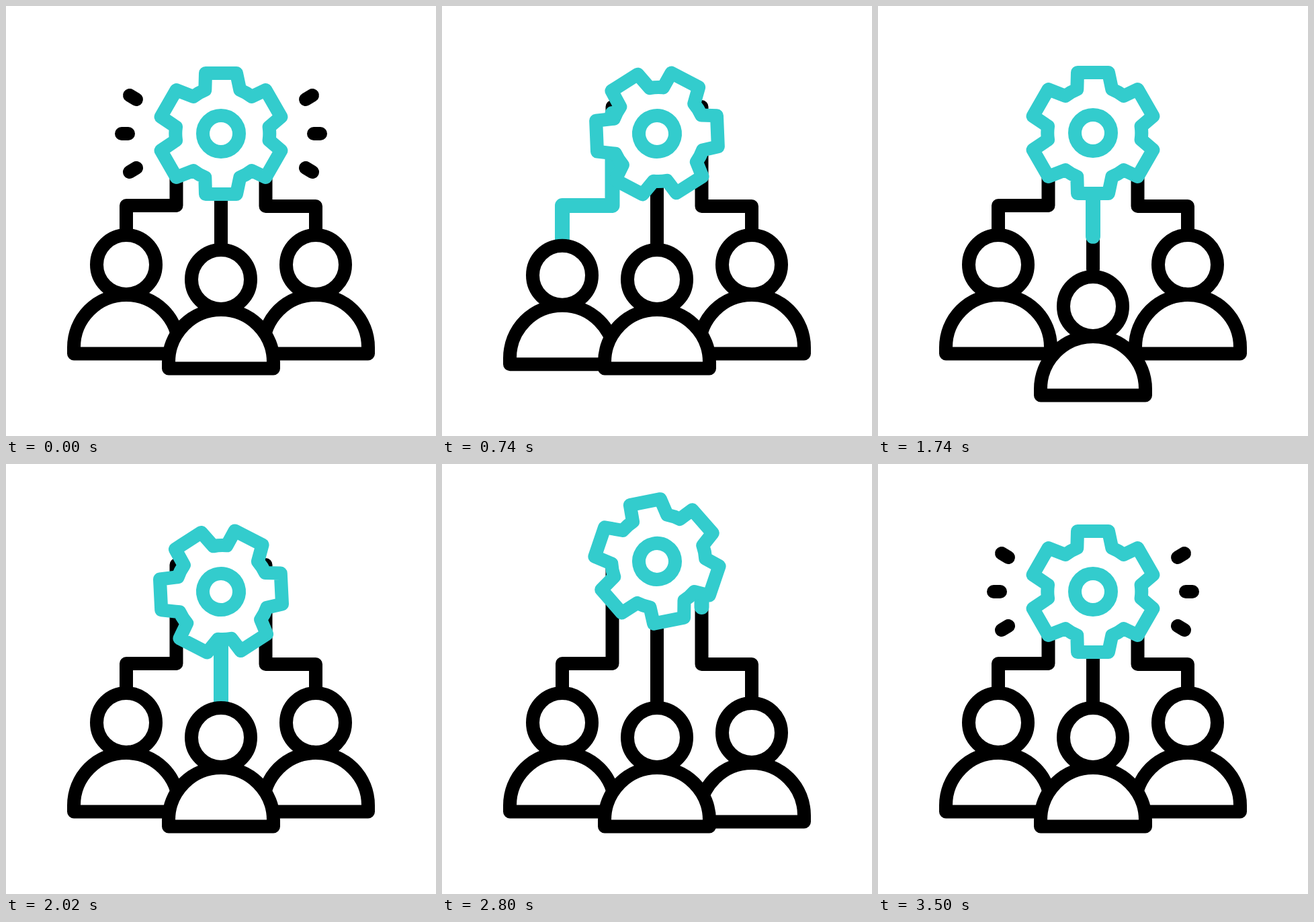
Write an HTML page that moves like this. It is 640 by 640 pixels and loops after 3600 ms.

```html
<!DOCTYPE html>
<html lang="en">
<head>
<meta charset="utf-8">
<title>Team gear</title>
<style>
  html, body { margin: 0; width: 100%; height: 100%; overflow: hidden; background: #fff; }
  svg { display: block; width: 100vw; height: 100vh; }
  path, circle { stroke-width: 20; stroke-linecap: round; stroke-linejoin: round; }
  .ink { stroke: #000; }
  .teal { stroke: #33cccd; }
  .solid { fill: #fff; }
  .line { fill: none; }
  .pulse { stroke-width: 22; }
</style>
</head>
<body>
<svg id="stage" viewBox="0 0 640 640"></svg>
<script>
const LOOP = 3600;
const stage = document.getElementById('stage');

function add(parent, tag, attrs) {
  const el = document.createElementNS('http://www.w3.org/2000/svg', tag);
  for (const k in attrs) el.setAttribute(k, attrs[k]);
  return parent.appendChild(el);
}

// Eased progress of t between two times
function ease(t, from, to) {
  const x = Math.min(1, Math.max(0, (t - from) / (to - from)));
  return x * x * (3 - 2 * x);
}

function gearPath() {
  const notchShift = 2.3;
  let d = '';
  for (let k = 0; k < 6; k++) {
    const a = k * Math.PI / 3, c = Math.cos(a), s = Math.sin(a);
    const at = (x, y, dx = 0) =>
      (x * c - y * s + dx).toFixed(2) + ' ' + (x * s + y * c).toFixed(2);
    d += (k ? 'A70 70 0 0 1 ' : 'M') + at(-26, -65, notchShift);
    d += 'L' + at(-23, -90) + 'L' + at(23, -90) + 'L' + at(26, -65, notchShift);
  }
  return d + 'A70 70 0 0 1 ' + (notchShift - 26) + ' -65Z';
}

// One entry per jump: start time, height, person, push depth, link line
const beats = [
  { start: 20,   rise: 79, x: 179, y: 385, push: 53, link: 'M253.500 160V297H179V400' },
  { start: 1180, rise: 76, x: 320, y: 407, push: 41, link: 'M320 160V392' },
  { start: 2380, rise: 75, x: 461, y: 385, push: 37, link: 'M386.500 170V298H461V400' }
];
const spins = [[602, 1420], [1840, 2915], [2960, 3490]];

// Links lie under the people and the gear
for (const b of beats) {
  add(stage, 'path', { d: b.link.replace('V', 'V150V'), class: 'ink line' });
  b.pulse = add(stage, 'path', { d: b.link, class: 'teal line pulse' });
  b.len = b.pulse.getTotalLength();
}

for (const i of [0, 2, 1]) {
  const b = beats[i];
  b.person = add(stage, 'g', {});
  add(b.person, 'path', { d: 'M-78 132.500V123a78 78 0 0 1 156 0V132.500Z', class: 'ink solid' });
  add(b.person, 'circle', { r: 44, class: 'ink solid' });
}

const gear = add(stage, 'g', {});
add(gear, 'path', { d: gearPath(), class: 'teal solid' });
add(gear, 'circle', { r: 27, class: 'teal solid' });

// Rays run from their inner end outwards
const rays = [];
for (const side of [-1, 1])
  for (const [x, y, dx, dy] of [[126, -51, 10, -6], [138, 0, 10, 0], [126, 51, 10, 6]])
    rays.push({
      el: add(stage, 'path', { class: 'ink line' }),
      x: 320 + side * x, y: 190 + y, dx: side * dx, dy
    });

function drawPulse(b, head, tail) {
  const len = (head - tail) * b.len;
  b.pulse.style.display = len > 0.5 ? '' : 'none';
  b.pulse.setAttribute('stroke-dasharray', `0 ${tail * b.len} ${len} ${b.len * 2}`);
}

function draw(t) {
  let lift = 0;
  for (const b of beats) {
    const p = t - b.start;
    lift += b.rise * (ease(p, 0, 280) - ease(p, 300, 580));
    const down = b.push * (ease(p, 290, 590) - ease(p, 590, 795));
    b.person.setAttribute('transform', `translate(${b.x} ${b.y + down})`);
    drawPulse(b, ease(p, 350, 650), ease(p, 730, 980));
  }

  let turn = 0;
  for (const [from, to] of spins) turn += 360 * ease(t, from, to);
  gear.setAttribute('transform', `translate(320 ${190 - lift}) rotate(${turn})`);

  const grow = 1 - ease(t, 20, 140) + ease(t, 3220, 3300);
  for (const r of rays) {
    r.el.style.display = grow > 0.01 ? '' : 'none';
    r.el.setAttribute('d', `M${r.x} ${r.y}l${r.dx * grow} ${r.dy * grow}`);
  }
}

const begin = performance.now();
function tick() {
  draw((performance.now() - begin) % LOOP);
  requestAnimationFrame(tick);
}
draw(0);
requestAnimationFrame(tick);
</script>
</body>
</html>
```
